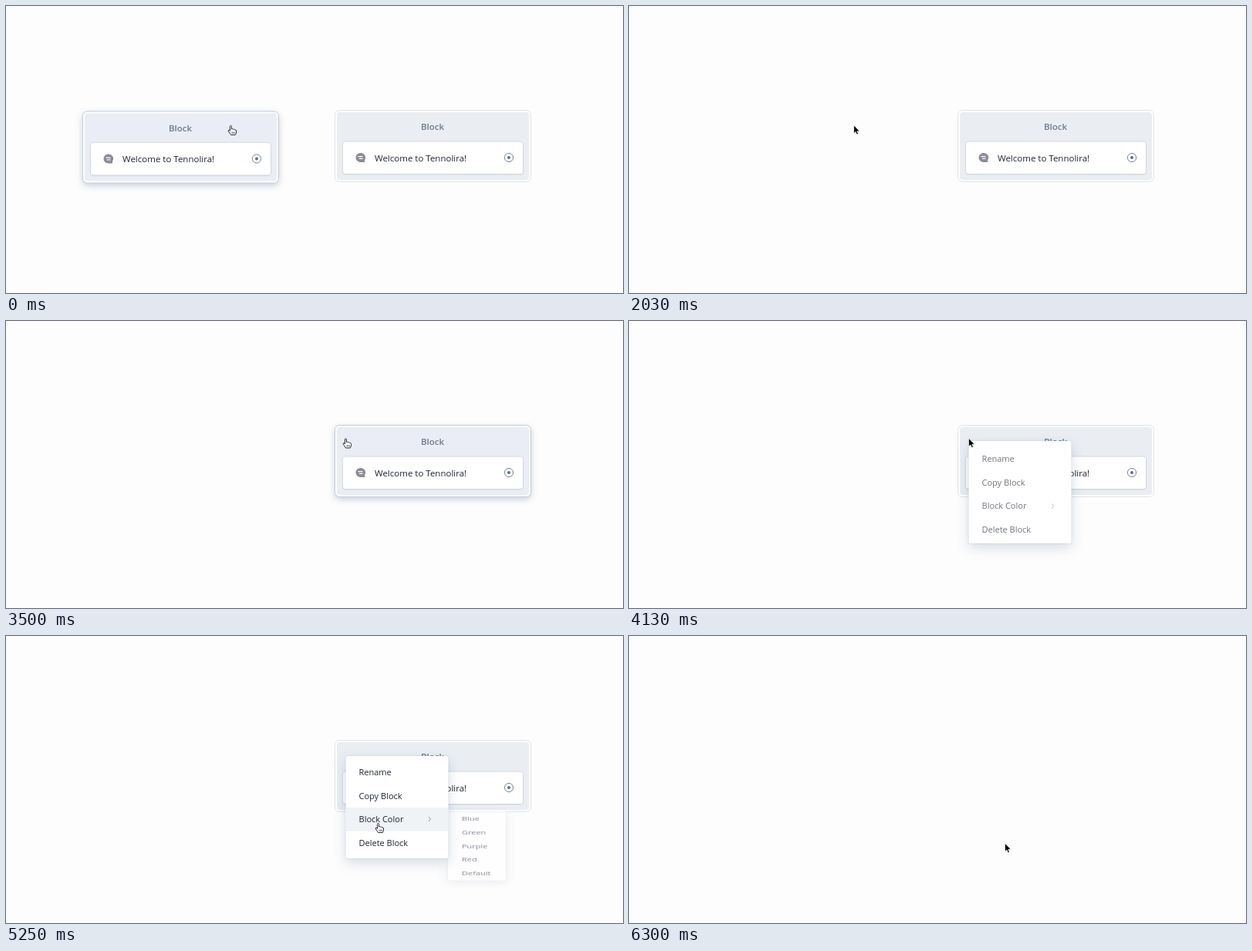
Write an HTML page that moves like this. It is 800x373 px and loops after 7.56 s.

```html
<!DOCTYPE html>
<html lang="en">
<head>
<meta charset="utf-8">
<title>Block actions</title>
<style>
html, body { margin: 0; width: 100%; height: 100%; overflow: hidden; background: #fdfdfd; }
svg { display: block; width: 800px; height: 373px; font: 11px "Open Sans", "Noto Sans", sans-serif; fill: #1d2438; }
.head { font-size: 11.5px; font-weight: 600; fill: #6b7b8e; text-anchor: middle; }
.say { font-size: 11.5px; }
.lift { filter: drop-shadow(0 3px 4px rgba(17, 49, 96, .22)); }
.card { fill: #fff; filter: drop-shadow(0 0 1px rgba(17, 49, 96, .2)) drop-shadow(0 1px 1px rgba(17, 49, 96, .08)); }
.pop { fill: #fff; filter: drop-shadow(0 0 1px rgba(17, 49, 96, .14)) drop-shadow(0 6px 8px rgba(17, 49, 96, .16)); }
.line { fill: none; stroke: #e6eaf0; }
</style>
</head>
<body>
<svg viewBox="0 0 800 373">
  <defs>
    <g id="bubble">
      <path d="M0-6A6 6 0 1 0 0 6H5.6V3.2A6 6 0 0 0 0-6Z" fill="#8b8b96"/>
      <path d="M-3-1.4H3M-1.6 1.4H3" stroke="#fff" stroke-width="1.4"/>
    </g>
    <g id="frame">
      <rect x="426.5" y="135.5" width="254" height="93" rx="6" fill="#fff" stroke="#dde3ea"/>
      <rect x="429" y="138" width="249" height="88" rx="4" fill="#eaeef3"/>
    </g>
    <g id="hover">
      <rect class="lift" x="426.5" y="135.5" width="254" height="93" rx="6" fill="#fff" stroke="#c3cdda"/>
      <rect x="429" y="138" width="249" height="88" rx="4" fill="#eaedf5"/>
    </g>
    <g id="content">
      <text class="head" x="553" y="161">Block</text>
      <rect class="card" x="437" y="176.5" width="233" height="41.5" rx="3.5"/>
      <use href="#bubble" x="459.5" y="197"/>
      <text class="say" x="478" y="201.5">Welcome to Tennolira!</text>
      <circle cx="652" cy="197" r="5.6" fill="#fff" stroke="#74869b"/>
      <circle cx="652" cy="197" r="2" fill="#5c7089"/>
    </g>
  </defs>

  <g id="left" transform="translate(-327 1.5)">
    <use href="#hover"/><use href="#content"/>
  </g>
  <g id="right">
    <use href="#frame"/><use id="glow" href="#hover"/><use href="#content"/>
  </g>

  <g id="sub"></g>
  <g id="menu">
    <rect class="pop" x="440.5" y="156" width="133" height="133" rx="3"/>
    <rect id="row" x="440.5" width="133" height="30.5" fill="#eff3f6"/>
    <g id="items">
      <path d="M548 235l2.6 3-2.6 3" fill="none" stroke="#8d98a8"/>
    </g>
  </g>

  <g id="drawer">
    <rect x=".5" y="-2" width="230" height="380" fill="#fefefe" stroke="#dfe4ea"/>
    <path class="line" d="M1 28.5H219M1 74.5H219"/>
    <text x="23.5" y="11" font-size="16" font-weight="600">Block</text>
    <use href="#bubble" x="29.5" y="52"/>
    <text x="47" y="56" font-weight="600">Speak</text>
  </g>

  <g id="cursor">
    <path id="arrow" d="M0 0V10.6L2.4 8.4 4 12 5.8 11.2 4.2 7.7H7.5Z" fill="#000" stroke="#fff" stroke-width=".6"/>
    <g id="hand" fill="#fff" stroke="#2c2c33" stroke-linejoin="round">
      <path d="M-1 7.4V1.4Q-1 .4 0 .4T1 1.4V5Q2 4.2 3 5.2 4 4.6 5 5.7 6.6 5.4 7 7V9Q7 11 5.8 12.5H0Q-1.5 10-3 8-4 6-2.5 6-1.8 6-1 7.4Z"/>
      <path d="M1.5 8.5V11M3.2 8.5V11M4.9 8.5V11" stroke-width=".7"/>
    </g>
  </g>
</svg>
<script>
const LOOP = 7560, ROW = 30.5, TOP = 162;
const $ = id => document.getElementById(id);
const ramp = (t, a, b) => Math.min(1, Math.max(0, (t - a) / (b - a)));
const ease = p => p * p * (3 - 2 * p);
const fade = (id, v) => $(id).setAttribute("opacity", v);
const move = (id, v) => $(id).setAttribute("transform", v);

function addRows(id, names, x, y) {
  $(id).insertAdjacentHTML("beforeend", names.map((name, i) =>
    `<text x="${x}" y="${y + i * ROW}">${name}</text>`).join(""));
}
addRows("items", ["Rename", "Copy Block", "Block Color", "Delete Block"], 457.5, 181);
$("sub").innerHTML = '<rect class="pop" x="573" width="75" height="159" rx="3"/>';
addRows("sub", ["Blue", "Green", "Purple", "Red", "Default"], 591, 25);

// Cursor stops: start, end, x, y
const stops = [[2800, 3500, 440.5, 152.5], [4480, 5180, 482.5, 243], [5250, 5600, 487.5, 269.5]];

function cursorAt(t) {
  let x = 291.5, y = 155;
  for (const [a, b, nx, ny] of stops) {
    const p = ease(ramp(t, a, b));
    x += (nx - x) * p;
    y += (ny - y) * p;
  }
  return [x, y];
}

function draw(t) {
  const [x, y] = cursorAt(t);
  const gone = 1 - ramp(t, 6060, 6160);
  const open = t >= 3920;

  fade("left", t < 1890 ? 1 : 0);
  const slide = ease(ramp(t, 735, 1110)) * (1 - ease(ramp(t, 1860, 2025)));
  move("drawer", `translate(${802 - 220 * slide})`);
  fade("right", (1 - .4 * slide) * gone);
  fade("glow", ramp(t, 3220, 3500) * (1 - ramp(t, 3900, 4060)));

  const show = ramp(t, 3920, 4340);
  fade("menu", ramp(t, 3880, 4080) * gone);
  fade("items", .25 + .75 * show);
  move("items", `translate(0 ${5 * (1 - show)})`);
  const row = Math.floor((y - TOP) / ROW);
  fade("row", open && row >= 0 ? 1 : 0);
  $("row").setAttribute("y", TOP + ROW * row);

  const grow = ramp(t, 5180, 5390) * (1 - ramp(t, 5460, 5600));
  move("sub", `translate(0 226) scale(1 ${.36 + .64 * grow})`);
  fade("sub", Math.min(1, 1.5 * grow));

  const hand = t < 1925 || (!open && x > 427) || (open && y > 158 && t < 6300);
  fade("hand", hand ? 1 : 0);
  fade("arrow", hand ? 0 : 1);
  move("cursor", `translate(${x} ${y})`);
}

const start = performance.now();
function tick() {
  draw((performance.now() - start) % LOOP);
  requestAnimationFrame(tick);
}
tick();
</script>
</body>
</html>
```
